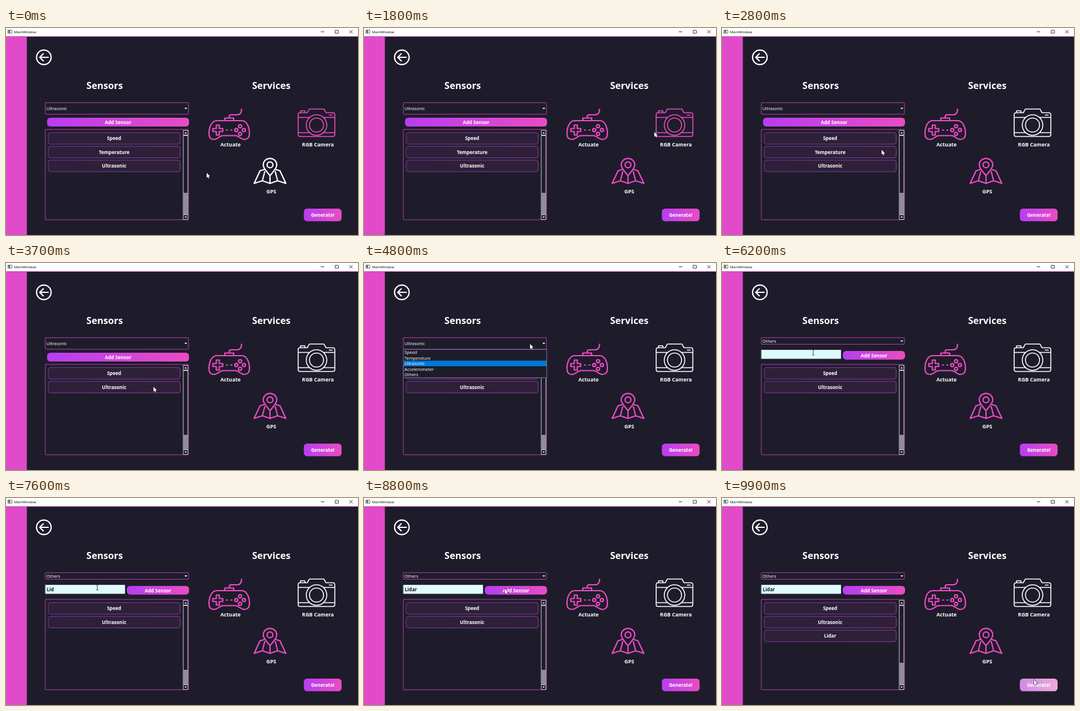
An HTML page with a canvas for the animation above (10 s loop, 600 by 353 pixels).

```html
<!DOCTYPE html>
<html lang="en">
<head>
<meta charset="utf-8">
<title>MainWindow</title>
<style>
html, body { margin: 0; width: 100%; height: 100%; overflow: hidden; background: #1e1c2b; }
canvas { display: block; }
</style>
</head>
<body>
<canvas width="600" height="353"></canvas>
<script>
const ctx = document.querySelector('canvas').getContext('2d');
const LOOP = 10000, STEP = 100;
const BG = '#1e1c2b', PINK = '#ee4bc4', BORDER = '#b83fa9', WHITE = '#fff';
const FONT = '"Noto Sans", "Open Sans", sans-serif';

// Event times in ms
const GPS_ON = 800, CAMERA_OFF = 2100, REMOVE = 3300, OPEN = 4800, CHOOSE = 5700,
      ADD = 9000, HOVER = 9600, KEYS = [7000, 7300, 7500, 7700, 7900];

// Pointer stops: time, x, y
const STOPS = [
  [0, 342, 247], [600, 447, 249], [1100, 447, 249], [1900, 497, 174], [2050, 523, 166],
  [2300, 523, 166], [2900, 252, 211], [4300, 251, 211], [4700, 283, 138], [4900, 283, 138],
  [5250, 161, 184.5], [5400, 161, 184.5], [5600, 156, 191], [5800, 156, 191], [6100, 155.5, 152.5],
  [8200, 155.5, 152.5], [8600, 240, 155], [9150, 240, 155], [9750, 532, 310], [LOOP, 532, 310]
];

const ring = (x, y, r) => `M${x + r} ${y}a${r} ${r} 0 1 1 ${-2 * r} 0a${r} ${r} 0 1 1 ${2 * r} 0`;

const ICONS = {
  back: new Path2D(ring(64.5, 50, 12.4) + 'M72 50H58M63.5 44L57.5 50L63.5 56'),
  pad: new Path2D(
    'M359 158H402C411 158 415 170 415 180C415 187 411 190 407 190C400 190 397 183.5 391 183.5' +
    'H370C364 183.5 361 190 354 190C349 190 346 187 346 180C346 170 350 158 359 158Z' +
    'M373 158V153.5H388V158M380.5 153V151Q380.5 148 384 148H394Q401.5 148 401.5 138.5' +
    'M358.5 165.5H363.5V171.5H369.5V176.5H363.5V182.5H358.5V176.5H352.5V171.5H358.5Z' +
    'M376 174H377.5M383.5 174H385' +
    ring(399, 167.5, 2.7) + ring(399, 180.5, 2.7) + ring(392.5, 174, 2.7) + ring(405.5, 174, 2.7)),
  camera: new Path2D(
    'M501 144.5H513.5L517 138.3H542L545.5 144.5H557Q560.5 144.5 560.5 148V181.5Q560.5 185 557 185' +
    'H501.5Q498 185 498 181.5V148Q498 144.5 501 144.5M502 144V141.3H509.5V144' +
    'M498 152.5H517M541.5 152.5H560.5M498 178.5H517M541.5 178.5H560.5M551 148.5H556' +
    ring(529.3, 165.5, 17.5) + ring(529.3, 165.5, 12)),
  gps: new Path2D(
    'M450 252C446 246 438.5 240 438.5 233.5A11.5 11.2 0 0 1 461.5 233.5C461.5 240 454 246 450 252Z' +
    ring(450, 233.3, 5) +
    'M439.5 241.5L433 243.5L423 265L437 260.5L450 265L463 260.5L477 265L467 243.5L460.5 241.5' +
    'M437 260.5L441 245M463 260.5L459 245M450 265V253'),
  window: new Path2D('M537 6.5H542M561.5 4H566.5V9H561.5ZM585.5 4L590.5 9M590.5 4L585.5 9'),
  arrow: new Path2D('M0 0V8.4L1.9 6.7L3.2 9.5L4.6 8.9L3.3 6.1H5.8Z'),
  beam: new Path2D('M-2 -4.5H-.5L0 -4L.5 -4.5H2M0 -4V4M-2 4.5H-.5L0 4L.5 4.5H2')
};

function fillRect(x, y, w, h, color) {
  ctx.fillStyle = color;
  ctx.fillRect(x, y, w, h);
}

function box(x, y, w, h, radius, fill, stroke) {
  ctx.beginPath();
  ctx.roundRect(x, y, w, h, radius);
  if (fill) { ctx.fillStyle = fill; ctx.fill(); }
  if (stroke) { ctx.strokeStyle = stroke; ctx.lineWidth = 1; ctx.stroke(); }
}

function text(str, x, y, size, { color = WHITE, weight = 700, align = 'center' } = {}) {
  ctx.font = `${weight} ${size}px ${FONT}`;
  ctx.textAlign = align;
  ctx.fillStyle = color;
  ctx.fillText(str, x, y);
}

function icon(path, color, width) {
  ctx.strokeStyle = color;
  ctx.lineWidth = width;
  ctx.stroke(path);
}

function triangle(x, y, half, height) {
  ctx.beginPath();
  ctx.moveTo(x - half, y);
  ctx.lineTo(x + half, y);
  ctx.lineTo(x, y + height);
  ctx.fillStyle = WHITE;
  ctx.fill();
}

function gradient(x, w, from, to) {
  const g = ctx.createLinearGradient(x, 0, x + w, 0);
  g.addColorStop(0, from);
  g.addColorStop(1, to);
  return g;
}

function button(label, x, y, w, h, baseline, from = '#b83df0', to = '#e94cc3') {
  box(x, y, w, h, 5.5, gradient(x, w, from, to));
  text(label, x + w / 2, baseline, 8.1);
}

function pointerAt(t) {
  const i = STOPS.findIndex(stop => stop[0] > t);
  const [t0, x0, y0] = STOPS[i - 1], [t1, x1, y1] = STOPS[i];
  const p = (t - t0) / (t1 - t0), e = p * p * (3 - 2 * p);
  return { x: x0 + (x1 - x0) * e, y: y0 + (y1 - y0) * e };
}

function drawTitleBar() {
  fillRect(0, 0, 600, 14, WHITE);
  fillRect(0, 14, 600, 1, '#c65cb8');
  box(3.5, 3.5, 6.5, 5.5, 0, '#eee', '#777');
  fillRect(4, 4, 3, 4.5, '#4d7c86');
  text('MainWindow', 13.8, 9, 6.15, { color: '#111', weight: 400, align: 'left' });
  icon(ICONS.window, '#222', 0.9);
}

function drawList(items) {
  box(67, 173, 244, 154, 1, null, BORDER);
  items.forEach((name, i) => {
    const y = 178.3 + i * 23.5;
    box(72, y, 225, 19.7, 3.5, '#2f2039', gradient(72, 225, '#73399f', '#8d3f9d'));
    text(name, 184.3, y + 13, 8.1);
  });
  const top = items.length > 2 ? 281 : 293;
  box(302.5, 174.5, 7.5, 8, 0, BG, '#c9c9d2');
  box(302.5, 183.5, 7.5, 134, 0, BG, '#c9c9d2');
  fillRect(302, top, 8.5, 318 - top, '#8f8c9e');
  box(302.5, 318.5, 7.5, 8, 0, BG, '#c9c9d2');
  triangle(306.2, 180, 2, -2.5);
  triangle(306.2, 321.5, 2, 2.5);
}

function drawDropdown(mouse) {
  const top = 147.5, row = 9.5;
  const hovered = mouse.y < top ? 2 : Math.min(4, Math.floor((mouse.y - top) / row));
  box(67.5, top, 244, 48, 0, BG, '#77758a');
  fillRect(68, top + hovered * row, 243, row, '#0078d7');
  ['Speed', 'Temperature', 'Ultrasonic', 'Accelerometer', 'Others'].forEach((name, i) =>
    text(name, 69, top + 7.7 + i * row, 7.35, { weight: 400, align: 'left' }));
}

function drawSensors(t, mouse) {
  const custom = t >= CHOOSE;
  const items = ['Speed', 'Temperature', 'Ultrasonic'];
  if (t >= REMOVE) items.splice(1, 1);
  if (t >= ADD) items.push('Lidar');
  drawList(items);

  box(67, 127.3, 244, custom ? 11.2 : 19.7, 1, null, BORDER);
  text(custom ? 'Others' : 'Ultrasonic', 69, custom ? 136 : 140, 7.35, { weight: 400, align: 'left' });
  triangle(306.5, custom ? 132 : 136, 2.5, 2.6);

  if (custom) {
    box(67.5, 148.5, 135, 14.5, 0, '#dffafc', '#c4dfe8');
    const typed = KEYS.filter(key => t >= key).length;
    text('Lidar'.slice(0, typed), 69.5, 158.5, 8.1, { color: '#14141c', align: 'left' });
    button('Add Sensor', 206, 150, 106, 14.7, 160.5);
  } else {
    button('Add Sensor', 70, 153, 242, 15, 163.6);
  }
  if (t >= OPEN && !custom) drawDropdown(mouse);
}

function drawServices(t) {
  icon(ICONS.pad, PINK, 2.2);
  icon(ICONS.camera, t < CAMERA_OFF ? PINK : WHITE, 1.6);
  icon(ICONS.gps, t < GPS_ON ? WHITE : PINK, 2.2);
  text('Actuate', 382.7, 202.3, 8.8);
  text('RGB Camera', 531.7, 202.3, 8.8);
  text('GPS', 452.2, 282.3, 8.8);
  const lit = t >= HOVER ? ['#cf8ae6', '#ebacd9'] : [];
  button('Generate!', 507.7, 308, 64.3, 21.5, 322.1, ...lit);
}

function drawPointer(t, { x, y }) {
  ctx.save();
  ctx.translate(x, y);
  if (t >= 6000 && t < 8300) {
    icon(ICONS.beam, '#444', 0.9);
  } else {
    icon(ICONS.arrow, '#111', 1);
    ctx.fillStyle = WHITE;
    ctx.fill(ICONS.arrow);
  }
  ctx.restore();
}

function draw(now) {
  const t = Math.floor(now % LOOP / STEP) * STEP;
  const mouse = pointerAt(t);
  ctx.lineCap = ctx.lineJoin = 'round';
  fillRect(0, 0, 600, 353, BG);
  fillRect(0, 15, 35.5, 338, '#e14bc9');
  drawTitleBar();
  icon(ICONS.back, WHITE, 2.2);
  text('Sensors', 168.2, 104.3, 16.1);
  text('Services', 452.2, 104.3, 16.1);
  drawSensors(t, mouse);
  drawServices(t);
  drawPointer(t, mouse);
}

const start = performance.now();
function tick() {
  draw(performance.now() - start);
  requestAnimationFrame(tick);
}
tick();
</script>
</body>
</html>
```
